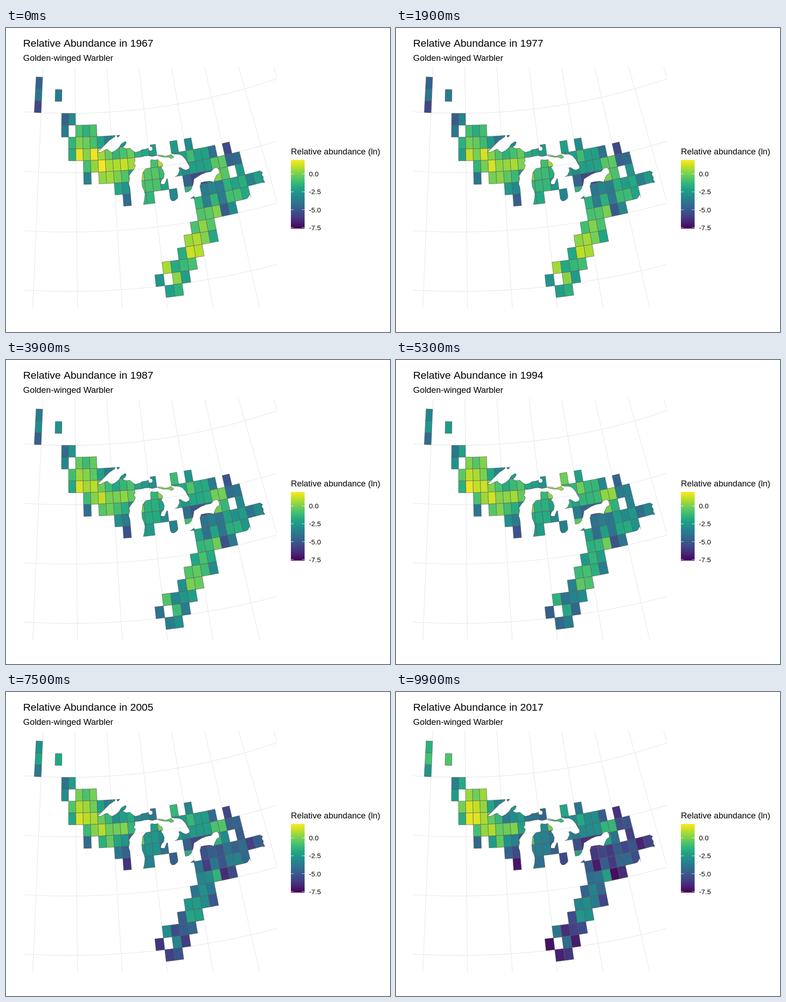
Write an HTML page with a canvas that moves like this. It is 841 px wide and 666 px high and loops after 10000 ms.

```html
<!DOCTYPE html>
<html lang="en">
<head>
<meta charset="utf-8">
<title>Relative abundance map</title>
<style>
html, body { margin: 0; width: 100%; height: 100%; overflow: hidden; background: #fff; }
canvas { display: block; }
</style>
</head>
<body>
<canvas id="stage" width="841" height="666"></canvas>
<script>
const ctx = document.getElementById('stage').getContext('2d');
const layer = document.createElement('canvas');
layer.width = 841;
layer.height = 666;
const land = layer.getContext('2d');

// Conic projection: lon counted in degrees east of the central meridian
const APEX = [137, -1221], STEP = 0.01068;
const radius = lat => 1408 + (50 - lat) * 26;
const project = (lon, lat) => [
  APEX[0] + radius(lat) * Math.sin(lon * STEP),
  APEX[1] + radius(lat) * Math.cos(lon * STEP)
];

// Change since the first year, by region, at the years in KNOTS
const KNOTS = [1967, 1977, 1987, 1994, 2000, 2011, 2017];
const TREND = {
  prairie: [0, 0, .9, 1.3, 1.3, 2.4, 3],
  west: [0, -.2, .4, .9, .5, 1, 1.3],
  steady: [0, -.5, -.2, .1, -.3, -.2, 0],
  inland: [0, -.4, -.8, -.5, -.9, -1, -1],
  north: [0, -.1, -.5, -.4, -1, -2.1, -2.2],
  lakes: [0, -.5, -1, -1, -1.6, -2.5, -2.8],
  peak: [0, .2, 1.3, 2.2, 1.6, .5, .4],
  ontario: [0, 0, .4, .9, .2, -.7, -.8],
  shore: [0, -.1, -.3, -.3, -1.1, -2.1, -2.4],
  east: [0, -.2, -.7, -.9, -1.9, -3.3, -3.5],
  hills: [0, -.2, -1.2, -1.7, -2.7, -3.7, -3.8],
  south: [0, -.1, -1.4, -2.2, -3, -4.4, -4.6]
};

const cells = [];
function row(lat, lon, trend, ...values) {
  values.forEach((value, i) => {
    const w = lon + i, path = new Path2D();
    [[w, lat + 1], [w + 1, lat + 1], [w + 1, lat], [w, lat]]
      .forEach(p => path.lineTo(...project(...p)));
    path.closePath();
    cells.push({ path, value, trend });
  });
}
row(52, -5, 'prairie', -4.6);
row(51, -5, 'prairie', -3.9);
row(51, -2, 'prairie', -3.7);
row(50, -5, 'prairie', -5.6);
row(49, -1, 'west', -4.7, -3.1);
row(48, -1, 'west', -3.7);
row(48, 1, 'west', -.8, -1.5, -.8);
row(47, 0, 'west', -1.4, .1, -.2, -.9);
row(47, 4, 'steady', -2, -3.4, -2.8, -2.6, -2.4);
row(46, 0, 'steady', -1.7, 1.6);
row(46, 2, 'west', .2);
row(46, 3, 'inland', 1.7, .6, -.3);
row(46, 6, 'north', -1.4, -.8, -.3, -1.6, -1.9, -2.4);
row(46, 14, 'peak', -2.4);
row(46, 16, 'ontario', -3.1);
row(45, 2, 'steady', -.9, .4);
row(45, 4, 'inland', 1.8, .7, .8, 1.1);
row(45, 8, 'lakes', .6);
row(45, 11, 'north', -.9);
row(45, 12, 'inland', .9);
row(45, 14, 'ontario', -2.2, -2.3, -1.1, -2.2, -2.2, -4.1);
row(45, 21, 'ontario', -5.5);
row(44, 2, 'inland', -3.4);
row(44, 4, 'lakes', .4);
row(44, 5, 'inland', .6);
row(44, 6, 'lakes', 0, -.7, -2.2);
row(44, 9, 'inland', .6);
row(44, 10, 'lakes', -.6, -.6, -1.2);
row(44, 14, 'ontario', -2.4, -3, -2.3, -2.3, -2.1, -.6, -.5, -4.6, -4.4);
row(43, 6, 'lakes', -1.9, -2.7);
row(43, 9, 'lakes', -.8, -.8, -.8, -2.1);
row(43, 15, 'ontario', -4.6, -5.5, -5.5);
row(43, 18, 'shore', -3.5, .1);
row(43, 20, 'east', -.6);
row(43, 22, 'east', -2.4);
row(42, 7, 'lakes', -4.3);
row(42, 9, 'lakes', -1.4, -1.4);
row(42, 13, 'shore', -3.2);
row(42, 17, 'shore', -3.7, -3.3, -3.6);
row(42, 20, 'east', -1.5, -2.1, -1.7, -3.3, -2.3);
row(41, 16, 'east', -1.4, -3.4, -1.4);
row(41, 19, 'shore', -3.6);
row(41, 20, 'east', -1, -.9, -1.9);
row(40, 16, 'east', -.7, -.5);
row(40, 18, 'shore', .1);
row(40, 19, 'shore', -4.9);
row(40, 20, 'east', -3);
row(39, 15, 'hills', -.8, .3, -.6);
row(38, 14, 'hills', .5, .8, .1, -1.9);
row(37, 13, 'hills', -1.7, 1.2, .9);
row(36, 11, 'south', .7, -1.8, -1.2, -.9);
row(35, 10, 'south', -2.6);
row(35, 12, 'south', .3, -2.3);
row(34, 11, 'south', -2.2, -1.5);

const bits = [
  ['M333 280L342 279 349 281 356 279 362 277 368 283 362 286 356 283 345 283Z', -.4, 'ontario'],
  ['M391 350L408 346 406 353 401 358 393 360Z', -1.4, 'ontario'],
  ['M404 374L412 368 413 375 410 373Z', -2.4, 'shore'],
  ['M557 314L562 316 560 321 564 327 563 331 567 338 563 339Z', -2.2, 'east']
].map(([d, value, trend]) => ({ path: new Path2D(d), value, trend }));

const water = [
  // upper lake
  'M201 272L209 264 217 256 226 247 239 238 241 230 243 238 245 240 249 236 250 228 335 228 329 254'
  + ' 315 256 316 260 320 261 321 266 318 269 313 268 312 263 306 265 298 266 292 270 283 272 277 268'
  + ' 271 263 263 264 256 261 261 257 264 251 261 248 252 254 247 262 240 268 232 272 226 269 222 265 216 267 207 272Z',
  // both sides of the central peninsula
  'M269 341L271 330 270 324 275 316 281 309 284 301 280 296 284 290 292 284 303 281 312 280 320 282'
  + ' 333 279 352 274 358 330 352 330 347 342 341 342 339 340 341 333 346 328 347 319 344 311 340 306'
  + ' 344 301 342 296 336 292 333 288 326 289 318 288 316 292 317 302 305 309 299 317 297 335 298 347'
  + ' 302 356 304 364 303 376 300 389 285 389Z',
  // eastern bay
  'M360 275L370 277 379 277 386 280 393 288 398 297 402 303 401 308 394 311 388 309 382 305 378 306'
  + ' 380 312 375 323 360 330Z',
  // eastern lake
  'M411 338L412 331 420 326 428 321 438 317 449 315 455 308 462 306 466 311 467 318 461 322 457 330'
  + ' 455 337 446 335 437 336 427 338 425 345 409 348Z',
  // coast corners
  'M378 368L375 374 367 381 362 378 360 374 355 390 385 390Z',
  'M534 365L530 372 523 378 540 382Z'
].map(d => new Path2D(d));

const STOPS = ['440154', '482576', '414487', '35608d', '2a788e', '21908c',
  '22a884', '43bf71', '7ad151', 'bbdf27', 'fde725'];
const RGB = STOPS.map(h => [0, 2, 4].map(i => parseInt(h.slice(i, i + 2), 16)));

function colour(value) {
  const t = Math.min(1, Math.max(0, (value + 7.65) / 9.6)) * 10;
  const k = Math.min(9, Math.floor(t));
  return `rgb(${RGB[k].map((c, i) => Math.round(c + (RGB[k + 1][i] - c) * (t - k)))})`;
}

function change(trend, year) {
  const v = TREND[trend];
  let k = 0;
  while (k < KNOTS.length - 2 && year > KNOTS[k + 1]) k++;
  return v[k] + (v[k + 1] - v[k]) * (year - KNOTS[k]) / (KNOTS[k + 1] - KNOTS[k]);
}

function paint({ path, value, trend }, year) {
  land.fillStyle = colour(value + change(trend, year));
  land.fill(path);
  land.stroke(path);
}

function drawLand(year) {
  land.clearRect(0, 0, 841, 666);
  land.strokeStyle = '#595959';
  land.lineWidth = 0.7;
  cells.forEach(c => paint(c, year));
  land.globalCompositeOperation = 'destination-out';
  water.forEach(w => land.fill(w));
  // shoreline, kept on the land side
  land.globalCompositeOperation = 'source-atop';
  land.lineWidth = 1.4;
  water.forEach(w => land.stroke(w));
  land.globalCompositeOperation = 'source-over';
  land.lineWidth = 0.7;
  bits.forEach(b => paint(b, year));
  ctx.drawImage(layer, 0, 0);
}

function drawGrid() {
  ctx.save();
  ctx.beginPath();
  ctx.rect(38, 85, 555, 530);
  ctx.clip();
  ctx.strokeStyle = '#ebebeb';
  ctx.lineWidth = 1.4;
  ctx.beginPath();
  for (let lon = -4; lon <= 31; lon += 5) {
    ctx.moveTo(...project(lon, 60));
    ctx.lineTo(...project(lon, 25));
  }
  for (let lat = 35; lat <= 50; lat += 5) {
    ctx.moveTo(...project(-10, lat));
    ctx.arc(...APEX, radius(lat), Math.PI / 2 + 10 * STEP, Math.PI / 2 - 40 * STEP, true);
  }
  ctx.stroke();
  ctx.restore();
}

function text(str, x, y, size) {
  ctx.fillStyle = '#000';
  ctx.font = `${size}px "Liberation Sans", Arial, sans-serif`;
  ctx.fillText(str, x, y);
}

function drawLegend() {
  text('Relative abundance (ln)', 624, 277, 18.55);
  const ramp = ctx.createLinearGradient(0, 439.5, 0, 289);
  STOPS.forEach((h, i) => ramp.addColorStop(i / 10, '#' + h));
  ctx.fillStyle = ramp;
  ctx.fillRect(624, 289, 30, 150.5);
  ['0.0', '-2.5', '-5.0', '-7.5'].forEach((label, i) => {
    const y = 319.8 + i * 39.1;
    ctx.fillStyle = '#fff';
    ctx.fillRect(624, y - 0.4, 6, 0.8);
    ctx.fillRect(648, y - 0.4, 6, 0.8);
    text(label, 663.5, y + 5.5, 15.2);
  });
}

let shown;
function frame(now) {
  const year = 1967 + Math.floor((now % 10000 + 100) / 200);
  if (year !== shown) {
    shown = year;
    ctx.fillStyle = '#fff';
    ctx.fillRect(0, 0, 841, 666);
    drawGrid();
    drawLand(year);
    text('Relative Abundance in ' + year, 37.5, 41, 22.8);
    text('Golden-winged Warbler', 37.5, 72, 18.85);
    drawLegend();
  }
  requestAnimationFrame(frame);
}
const start = performance.now();
const tick = frame;
frame = () => tick(performance.now() - start);
frame();
</script>
</body>
</html>
```
